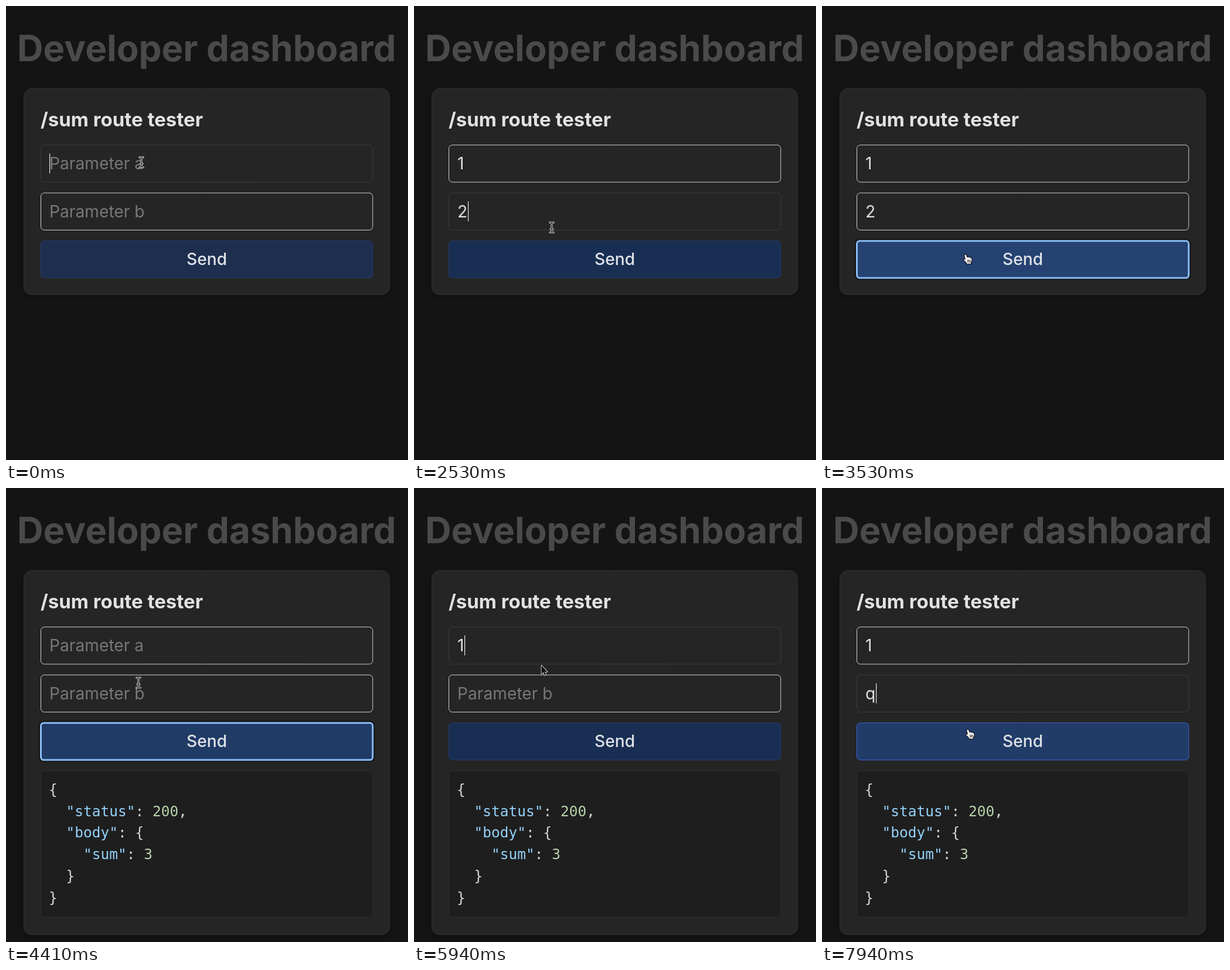
An HTML page with a canvas that plays this animation: 686 px wide and 773 px high, repeating every 8 s.

```html
<!DOCTYPE html>
<html lang="en">
<head>
<meta charset="utf-8">
<title>Developer dashboard</title>
<style>
  html, body { margin: 0; width: 100%; height: 100%; overflow: hidden; background: #141414; }
  canvas { display: block; width: 686px; height: 773px; }
</style>
</head>
<body>
<canvas id="stage" width="686" height="773"></canvas>
<script>
const ctx = document.getElementById('stage').getContext('2d');
const LOOP = 8000, TICK = 1000 / 17, BLINK = 500, FADE = 200;
const SANS = 'Inter, "Open Sans", sans-serif';
const MONO = '"DejaVu Sans Mono", monospace';

// Form rows share one left edge, size and pitch
const LEFT = 59.5, TOP = 236.7, WIDTH = 566.3, HEIGHT = 63.2, PITCH = 81.6;
const rowY = i => TOP + i * PITCH;

// Pointer hotspot: time, x, y
const PATH = [
  [0, 231, 266], [680, 231, 266], [850, 233, 290], [1000, 235, 322], [1130, 236, 338],
  [2320, 236, 338], [2530, 235, 377], [2650, 238, 405], [2800, 243, 420], [3000, 245, 424],
  [4260, 245, 424], [4350, 232, 370], [4410, 226, 332], [4560, 223, 295], [4850, 221, 276],
  [5740, 221, 276], [5850, 218, 288], [5940, 217, 302], [6080, 219, 328], [6290, 224, 346],
  [7500, 224, 346], [7700, 236, 378], [7800, 243, 400], [7940, 249, 412], [8000, 250, 414]
];
const HOVERS = [[2630, 4300], [7800, 9000]];
const RESPONSE_AT = 3700;

// Each event may move the focus, fill a field or clear both
const EVENTS = [
  { t: 0, focus: 'a', blink: 30 },
  { t: 645, a: '1' },
  { t: 1585, focus: 'b', blink: 1560 },
  { t: 2175, b: '2' },
  { t: 3525, focus: 'send' },
  { t: RESPONSE_AT, a: '', b: '' },
  { t: 5235, focus: 'a', blink: 5210 },
  { t: 5825, a: '1' },
  { t: 6815, focus: 'b', blink: 6790 },
  { t: 7465, b: 'q' }
];

const PLAIN = '#d6d6d6', KEY = '#94d2fa', NUM = '#b8d1ab';
const RESPONSE = [
  [['{', PLAIN]],
  [['  "status"', KEY], [': ', PLAIN], ['200', NUM], [',', PLAIN]],
  [['  "body"', KEY], [': {', PLAIN]],
  [['    "sum"', KEY], [': ', PLAIN], ['3', NUM]],
  [['  }', PLAIN]],
  [['}', PLAIN]]
];

function stateAt(t) {
  const s = { a: '', b: '', focus: '', blink: 0 };
  for (const e of EVENTS) {
    if (e.t > t) break;
    Object.assign(s, { blink: e.t }, e);
  }
  s.caret = t < s.blink || Math.floor((t - s.blink) / BLINK) % 2 === 0;
  return s;
}

function pointerAt(t) {
  const i = Math.max(1, PATH.findIndex(p => p[0] > t));
  const [t0, x0, y0] = PATH[i - 1], [t1, x1, y1] = PATH[i];
  const k = (t - t0) / (t1 - t0);
  return [x0 + (x1 - x0) * k, y0 + (y1 - y0) * k];
}

function hoverAt(t) {
  const clamp = v => Math.min(1, Math.max(0, v));
  return Math.max(...HOVERS.map(([on, off]) =>
    Math.min(clamp((t - on) / FADE), clamp(1 - (t - off - 40) / FADE))));
}

function mix(from, to, k) {
  return `rgb(${from.map((v, i) => Math.round(v + (to[i] - v) * k))})`;
}

function text(str, x, y, font, color, align = 'left') {
  ctx.font = font;
  ctx.fillStyle = color;
  ctx.textAlign = align;
  ctx.fillText(str, x, y);
}

function box(x, y, w, h, r, fill, stroke, line = 1) {
  ctx.beginPath();
  ctx.roundRect(x, y, w, h, r);
  if (fill) { ctx.fillStyle = fill; ctx.fill(); }
  if (stroke) { ctx.strokeStyle = stroke; ctx.lineWidth = line; ctx.stroke(); }
}

function card(h) {
  ctx.save();
  ctx.shadowColor = 'rgba(0,0,0,.35)';
  ctx.shadowBlur = 6;
  ctx.shadowOffsetY = 2;
  box(30.5, 140.5, 624, h, 13, '#252525');
  ctx.restore();
  box(30.5, 140.5, 624, h, 13, null, '#313131');
}

function field(name, y, s) {
  const focused = s.focus === name, value = s[name];
  box(LEFT, y, WIDTH, HEIGHT, 6, '#252525', focused ? '#3d3d3d' : '#cfcfcf');
  text(value || 'Parameter ' + name, 74, y + 41.3, `28.2px ${SANS}`, value ? '#e0e0e0' : '#777');
  if (focused && s.caret) {
    const x = 74 + (value ? Math.ceil(ctx.measureText(value).width) : 0);
    ctx.fillStyle = '#e6e6e6';
    ctx.fillRect(x, y + 14.3, 1.2, 34);
  }
}

function sendButton(t, focused) {
  const k = hoverAt(t), y = rowY(2);
  const base = t < 2340 ? [30, 46, 79] : [25, 46, 83];
  box(LEFT, y, WIDTH, HEIGHT, 6, mix(base, [37, 66, 114], k),
    mix([36, 62, 112], [66, 96, 215], Math.min(1, k * 1.5)));
  if (focused) {
    box(LEFT - 2, y - 2, WIDTH + 4, HEIGHT + 4, 7, null, '#101214', 3);
    box(LEFT, y, WIDTH, HEIGHT, 5, null, '#8abcf3', 3);
  }
  text('Send', 342.5, y + 41.3, `500 28.2px ${SANS}`, '#e0e3e8', 'center');
}

function response() {
  box(LEFT, 481.5, WIDTH, 249.3, 6, '#1e1e1e', '#303030');
  RESPONSE.forEach((parts, row) => {
    let x = 73;
    for (const [str, color] of parts) {
      text(str, x, 522 + row * 36.7, `24.5px ${MONO}`, color);
      x += ctx.measureText(str).width;
    }
  });
}

function outline(d, fill, edge, width) {
  const p = new Path2D(d);
  ctx.strokeStyle = edge;
  ctx.lineWidth = width;
  ctx.stroke(p);
  if (fill) { ctx.fillStyle = fill; ctx.fill(p); }
}

function pointer(x, y) {
  const inside = (top, bottom) => y >= top && y <= bottom;
  ctx.save();
  ctx.translate(x, y);
  ctx.lineJoin = ctx.lineCap = 'round';
  if (inside(400, 464)) {
    ctx.scale(.95, .92);
    outline('M-2 0C-1-1 1-1 1.5 1L3 5C4 3.5 5.5 4 6 5C7 4 8 4.5 8.5 5.5' +
      'C10 5 11 6 11 8V11L9.5 13V16H2.5L1 13L-3 9.5C-3.5 8-2 7 0 9Z', '#f4f4f4', '#0a0a0a', 2.4);
    outline('M4 9V13.5M6.2 9V13.5M8.4 9V13.5', null, '#1a1a1a', 1);
  } else if (inside(236, 300) || inside(318, 382)) {
    const beam = 'M-3.2-8.5Q0-8.5 0-6.5Q0-8.5 3.2-8.5M0-6.5V6.5' +
      'M-3.2 8.5Q0 8.5 0 6.5Q0 8.5 3.2 8.5M-2 2.5H2';
    outline(beam, null, '#e8e8e8', 3);
    outline(beam, null, '#151515', 1.2);
  } else {
    outline('M.5 0V14.5L3.8 11.5L6 16.8L8.3 15.8L6.1 10.7H10.6Z', '#111', '#f2f2f2', 1.6);
  }
  ctx.restore();
}

function draw(t) {
  const s = stateAt(t), answered = t >= RESPONSE_AT;
  ctx.fillStyle = '#141414';
  ctx.fillRect(0, 0, 686, 773);
  text('Developer dashboard', 342.3, 93.5, `bold 61.75px ${SANS}`, '#4a4a4a', 'center');
  card(answered ? 620 : 351);
  text('/sum route tester', 59, 205, `bold 33px ${SANS}`, '#e2e2e2');
  field('a', rowY(0), s);
  field('b', rowY(1), s);
  sendButton(t, s.focus === 'send');
  if (answered) response();
  pointer(...pointerAt(t));
}

function loop() {
  const t = performance.now() % LOOP;
  draw(Math.floor((t + 2) / TICK) * TICK % LOOP);
  requestAnimationFrame(loop);
}
loop();
</script>
</body>
</html>
```
